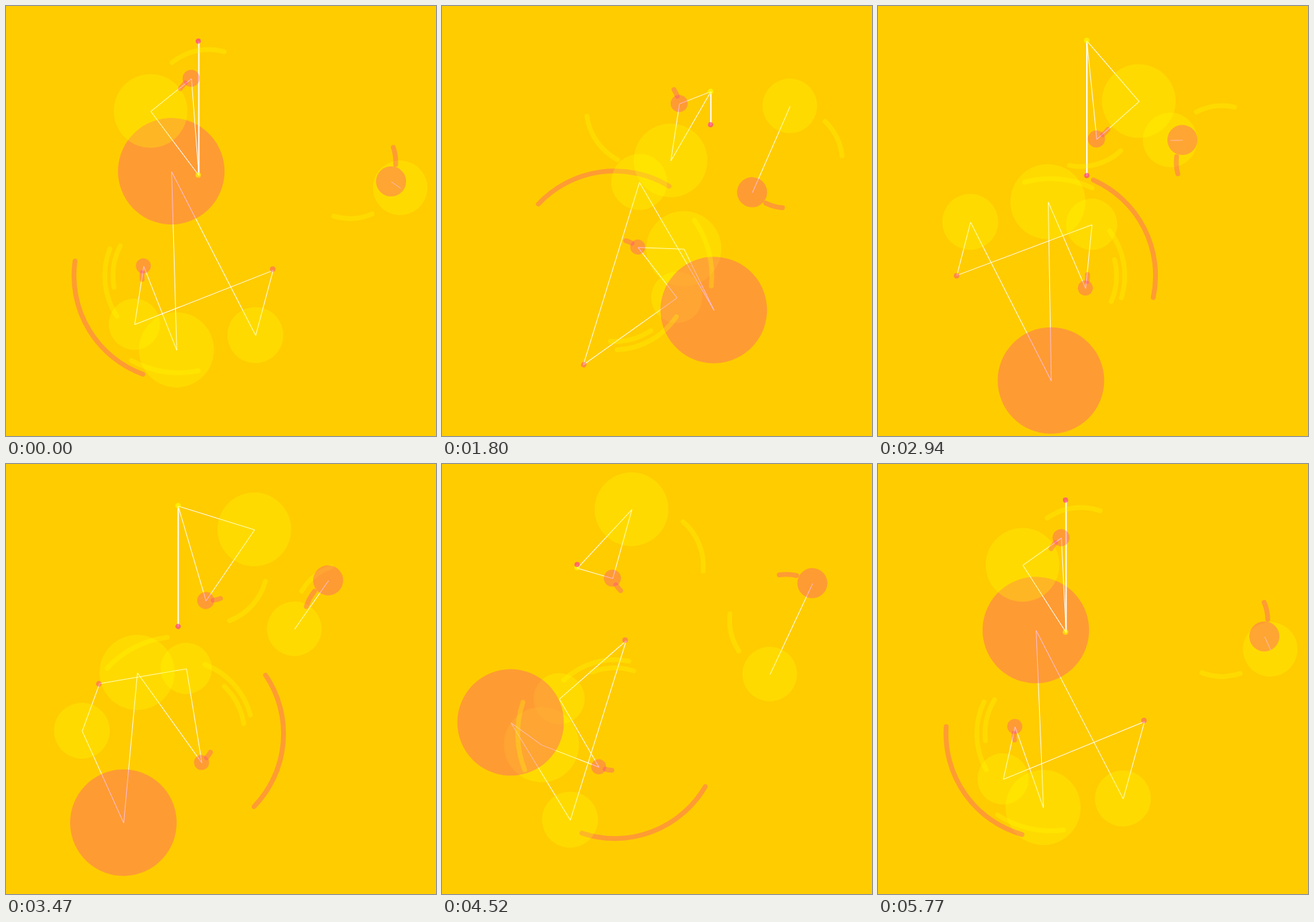
These frames come from a looping animation (630x630 px, 5870 ms). An HTML page without scripts:

```html
<!DOCTYPE html>
<html lang="en">
<head>
<meta charset="utf-8">
<title>Orbits</title>
<style>
@property --t {
  syntax: "<angle>";
  inherits: true;
  initial-value: 0deg;
}

html, body {
  margin: 0;
  height: 100%;
  overflow: hidden;
  background: #fc0;
}

svg {
  display: block;
  width: 100vw;
  height: 100vh;
  animation: orbit 5870ms infinite;
}

/* One shared angle, advanced in ticks of about 87 ms */
@keyframes orbit {
  0% { --t: 0deg; animation-timing-function: steps(9); }
  13.1% { --t: 48.4deg; animation-timing-function: steps(12); }
  30.65% { --t: 113.2deg; animation-timing-function: steps(13); }
  50.07% { --t: 184deg; animation-timing-function: steps(6); }
  59.1% { --t: 216deg; animation-timing-function: steps(12); }
  76.98% { --t: 280.3deg; animation-timing-function: steps(14); }
  98.28%, 100% { --t: 355.9deg; animation-timing-function: step-end; }
}

.cw { transform: rotate(var(--t)); }
.ccw { transform: rotate(calc(-1 * var(--t))); }

.pink { --c: rgb(255 57 153 / .333); }
.yellow { --c: rgb(255 255 0 / .27); }
circle { fill: var(--c); }
.arc {
  fill: none;
  stroke: var(--c);
  stroke-width: 7;
  stroke-linecap: round;
}
.pink .dot { fill: rgb(255 51 153 / .65); }
.pink .soft { fill: rgb(255 51 153 / .42); }
.yellow .dot { fill: rgb(255 255 0 / .6); }

/* A line joins two polar points: (--r, --a) and (--q, --b) */
.lines rect {
  --x: calc(var(--r) * cos(var(--a)));
  --y: calc(var(--r) * sin(var(--a)));
  --dx: calc(var(--q) * cos(var(--b)) - var(--x));
  --dy: calc(var(--q) * sin(var(--b)) - var(--y));
  fill: #fff;
  y: -.5px;
  height: 1px;
  width: hypot(var(--dx), var(--dy));
  transform: translate(var(--x), var(--y)) rotate(atan2(var(--dy), var(--dx)));
}
.lines .thick { y: -1px; height: 2px; }

.low {
  --sun: calc(265.9deg + var(--t));
  --bead: calc(195.6deg + var(--t));
  --tip: calc(-3.5deg + var(--t));
  --wide: calc(91.8deg - var(--t));
  --mid: calc(37.8deg - var(--t));
  --small: calc(132.5deg - var(--t));
}
.top {
  --bead: calc(239.2deg + var(--t));
  --tip: calc(261.2deg + var(--t));
  --wide: calc(177.1deg - var(--t));
  --end: calc(98.8deg - var(--t));
}
.side {
  --bead: calc(25.2deg + var(--t));
  --wide: calc(27.1deg - var(--t));
}
</style>
</head>
<body>
<svg viewBox="0 0 630 630">
  <g class="low" transform="translate(253.1 395.2)">
    <g class="lines" transform="translate(.5 .6)">
      <rect style="--r:153.5px; --a:var(--sun); --q:108.6px; --b:var(--wide)"/>
      <rect style="--r:108.6px; --a:var(--wide); --q:53.8px; --b:var(--bead)"/>
      <rect style="--r:53.8px; --a:var(--bead); --q:96.3px; --b:var(--small)"/>
      <rect style="--r:96.3px; --a:var(--small); --q:138px; --b:var(--tip)"/>
      <rect style="--r:138px; --a:var(--tip); --q:142px; --b:var(--mid)"/>
      <rect style="--r:142px; --a:var(--mid); --q:153.5px; --b:var(--sun)"/>
    </g>
    <g class="ccw yellow">
      <circle cx="108.6" r="55" transform="rotate(91.8)"/>
      <circle cx="96.3" r="37.5" transform="rotate(132.5)"/>
    </g>
    <g class="cw pink">
      <circle cx="153.5" r="78" transform="rotate(265.9)"/>
      <circle cx="53.8" r="11" transform="rotate(195.6)"/>
      <circle class="soft" cx="138" r="4" transform="rotate(-4)"/>
      <circle class="arc" r="153.5" pathLength="360" stroke-dasharray="78 360" transform="rotate(110)"/>
      <circle class="arc" r="53.8" pathLength="360" stroke-dasharray="10.6 360" transform="rotate(174.2)"/>
    </g>
    <g class="ccw yellow">
      <circle cx="142" r="41" transform="rotate(37.8)"/>
      <circle class="arc" r="108.4" pathLength="360" stroke-dasharray="54.5 360" transform="rotate(146.8)"/>
      <circle class="arc" r="96.3" pathLength="360" stroke-dasharray="37.2 360" transform="rotate(169.9)"/>
      <circle class="arc" r="142.2" pathLength="360" stroke-dasharray="40.8 360" transform="rotate(78.4)"/>
    </g>
  </g>

  <g class="top" transform="translate(297.2 149.5)">
    <g class="lines" transform="translate(.5 .6)">
      <rect style="--r:85.5px; --a:var(--wide); --q:50.7px; --b:var(--bead)"/>
      <rect style="--r:50.7px; --a:var(--bead); --q:99.3px; --b:var(--end)"/>
      <rect style="--r:99.3px; --a:var(--end); --q:85.5px; --b:var(--wide)"/>
      <rect class="thick" style="--r:99.3px; --a:var(--end); --q:99.3px; --b:var(--tip)"/>
    </g>
    <g class="ccw yellow">
      <circle cx="85.5" r="54" transform="rotate(177.1)"/>
      <circle class="dot" cx="99.3" r="4" transform="rotate(99)"/>
      <circle class="arc" r="85.7" pathLength="360" stroke-dasharray="54.2 360" transform="rotate(231)"/>
    </g>
    <g class="cw pink">
      <circle cx="50.7" r="12.5" transform="rotate(239.2)"/>
      <circle class="dot" cx="99.3" r="3.8" transform="rotate(261)"/>
      <circle class="arc" r="50.5" pathLength="360" stroke-dasharray="12.6 360" transform="rotate(214.3)"/>
    </g>
  </g>

  <g class="side" transform="translate(504 228.7)">
    <g class="lines" transform="translate(.5 .6)">
      <rect style="--r:66.5px; --a:var(--bead); --q:82.6px; --b:var(--wide)"/>
    </g>
    <g class="ccw yellow">
      <circle cx="82.6" r="40" transform="rotate(27.1)"/>
      <circle class="arc" r="82.6" pathLength="360" stroke-dasharray="39.8 360" transform="rotate(67)"/>
    </g>
    <g class="cw pink">
      <circle cx="66.5" r="22" transform="rotate(25.2)"/>
      <circle class="arc" r="67" pathLength="360" stroke-dasharray="21.9 360" transform="rotate(-18.8)"/>
    </g>
  </g>
</svg>
</body>
</html>
```
